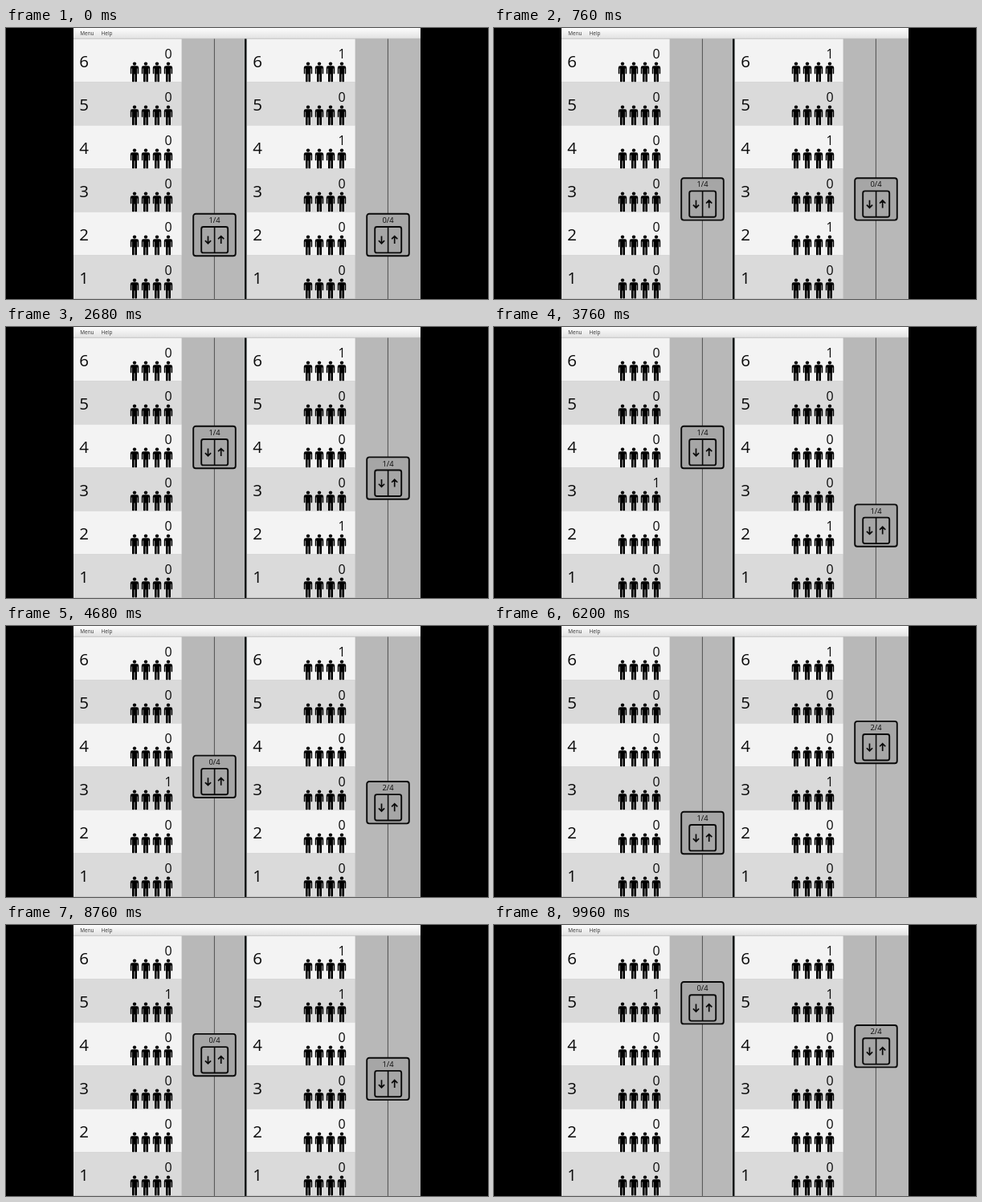
Recreate the animation shown at these times as an HTML page. Size 600 by 338 pixels, loop 10 s.

```html
<!DOCTYPE html>
<html lang="en">
<head>
<meta charset="utf-8">
<title>Elevators</title>
<style>
html, body { margin: 0; width: 100%; height: 100%; overflow: hidden; background: #000; }
svg { display: block; width: 600px; height: 338px; }
text { font-family: "Open Sans", "Noto Sans", sans-serif; fill: #0a0a0a; }
.floor { font-size: 20.5px; text-anchor: middle; }
.count { font-size: 16px; text-anchor: middle; }
.load { font-size: 9.4px; text-anchor: middle; }
.menu { font-size: 6.4px; fill: #333; }
</style>
</head>
<body>
<svg id="stage" viewBox="0 0 600 338">
  <defs>
    <linearGradient id="bar" x1="0" y1="0" x2="0" y2="1">
      <stop offset="0" stop-color="#fdfdfd"/>
      <stop offset="1" stop-color="#e2e2e2"/>
    </linearGradient>
    <g id="person">
      <circle cy="44.6" r="2.2"/>
      <path d="M-3 47.2H3Q5.2 47.2 5.2 49.4V56.4Q5.2 57.3 4.4 57.3T3.6 56.4V50.4H3V66.4Q3 67.5 1.75 67.5T.4 66.4V57.6H-.4V66.4Q-.4 67.5 -1.7 67.5T-3 66.4V50.4H-3.6V56.4Q-3.6 57.3 -4.4 57.3T-5.2 56.4V49.4Q-5.2 47.2 -3 47.2Z"/>
    </g>
    <g id="cabin" fill="none" stroke="#0a0a0a" stroke-width="1.9">
      <rect x="149.2" y=".8" width="52.6" height="52.4" rx="3" fill="#a6a6a6"/>
      <rect x="159.2" y="17" width="33" height="32.4" rx="2.5"/>
      <path d="M175.6 17V49.4" stroke-width="1.6"/>
      <path d="M167.5 28.4V37.8M163.9 34.2L167.5 37.8L171.1 34.2M183.7 38V28.6M180.1 32.2L183.7 28.6L187.3 32.2" stroke-width="1.7"/>
    </g>
  </defs>
  <rect width="600" height="338"/>
  <rect x="84" width="432" height="338" fill="#b8b8b8"/>
</svg>
<script>
const LOOP = 10000, TICK = 1005, LEG = 1000, STEP = 54;
const stage = document.getElementById("stage");

function add(parent, tag, attrs, text) {
  const el = document.createElementNS("http://www.w3.org/2000/svg", tag);
  for (const k in attrs) el.setAttribute(k, attrs[k]);
  if (text !== undefined) el.textContent = text;
  parent.appendChild(el);
  return el;
}

// Floor reached at each tick; waiting and load list [time, value] changes.
const shafts = [
  {
    x: 84,
    stops: [2, 3, 4, 4, 4, 3, 2, 2, 3, 4, 5],
    load: [[0, 1], [4 * TICK, 0], [5 * TICK, 1], [7 * TICK, 0]],
    waiting: {
      3: [[0, 0], [3700, 1], [5 * TICK, 0]],
      5: [[0, 0], [6700, 1]]
    }
  },
  {
    x: 300,
    stops: [2, 3, 4, 3, 2, 3, 4, 5, 4, 3, 4],
    load: [[0, 0], [2 * TICK, 1], [4 * TICK, 2], [7 * TICK, 1], [9 * TICK, 2]],
    waiting: {
      2: [[0, 0], [700, 1], [4 * TICK, 0]],
      3: [[0, 0], [5400, 1], [8 * TICK, 0]],
      4: [[0, 1], [2 * TICK, 0]],
      5: [[0, 0], [8500, 1]],
      6: [[0, 1]]
    }
  }
];

function build(s) {
  const g = add(stage, "g", { transform: `translate(${s.x} 0)` });
  s.counts = {};
  for (let floor = 6; floor >= 1; floor--) {
    const row = add(g, "g", { transform: `translate(0 ${(6 - floor) * STEP})` });
    add(row, "rect", { y: 13.5, width: 134.6, height: STEP, fill: floor % 2 ? "#dadada" : "#f3f3f3" });
    add(row, "text", { class: "floor", x: 13, y: 49.4 }, floor);
    s.counts[floor] = add(row, "text", { class: "count", x: 118, y: 37.6 }, 0);
    for (let i = 0; i < 4; i++) add(row, "use", { href: "#person", x: 76 + i * 14 });
  }
  add(g, "rect", { x: 174.9, y: 13, width: 1, height: 325, fill: "#505050" });
  s.lift = add(g, "g", {});
  add(s.lift, "use", { href: "#cabin" });
  s.label = add(s.lift, "text", { class: "load", x: 175.5, y: 12 });
}

shafts.forEach(build);
add(stage, "rect", { x: 297, y: 13, width: 2.4, height: 325, fill: "#101818" });
add(stage, "rect", { x: 84, width: 432, height: 13, fill: "url(#bar)" });
add(stage, "rect", { x: 84, y: 12.8, width: 432, height: .7, fill: "#c4c4c4" });
add(stage, "text", { class: "menu", x: 92.3, y: 9 }, "Menu");
add(stage, "text", { class: "menu", x: 118.6, y: 9 }, "Help");

// Speeds up over the first fifth, slows down over the last.
function ease(u) {
  if (u <= 0) return 0;
  if (u >= 1) return 1;
  if (u < .2) return 3.125 * u * u;
  if (u > .8) return 1 - 3.125 * (1 - u) ** 2;
  return 1.25 * u - .125;
}

function valueAt(list, t) {
  let v = list[0][1];
  for (const [start, next] of list) if (t >= start) v = next;
  return v;
}

function setText(el, text) {
  if (el.textContent !== text) el.textContent = text;
}

function draw(t) {
  const k = Math.floor(t / TICK);
  const p = ease((t - k * TICK) / LEG);
  for (const s of shafts) {
    const floor = s.stops[k] + (s.stops[k + 1] - s.stops[k]) * p;
    s.lift.setAttribute("transform", `translate(0 ${(339 - floor * STEP).toFixed(2)})`);
    setText(s.label, valueAt(s.load, t) + "/4");
    for (const f in s.waiting) setText(s.counts[f], String(valueAt(s.waiting[f], t)));
  }
}

function frame() {
  draw(performance.now() % LOOP);
  requestAnimationFrame(frame);
}
draw(0);
requestAnimationFrame(frame);
</script>
</body>
</html>
```
